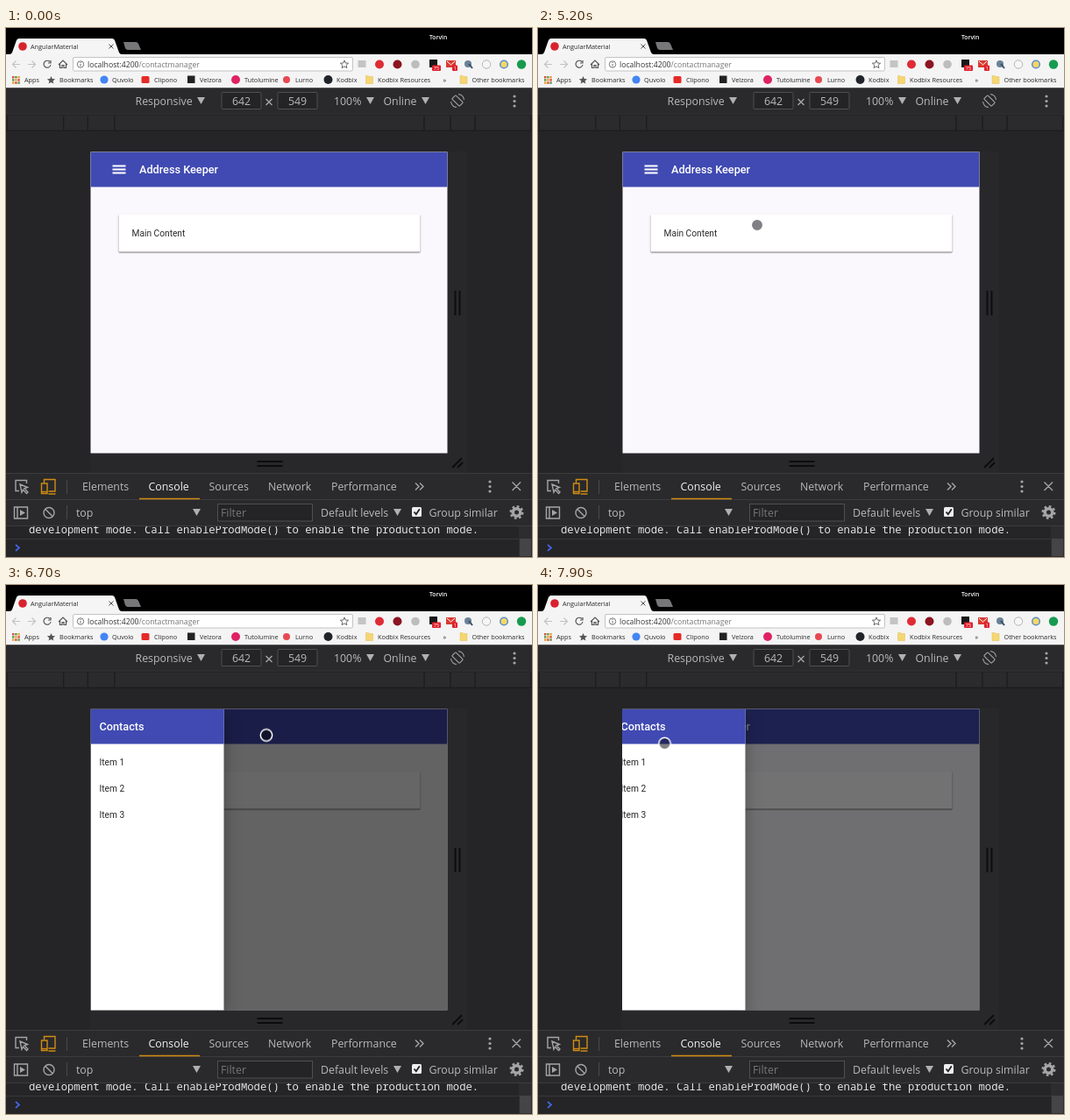
These frames come from a looping animation (600x604 px, 8 s). An HTML page:

```html
<!DOCTYPE html>
<html lang="en">
<head>
<meta charset="utf-8">
<title>Side navigation demo</title>
<style>
html, body { margin: 0; width: 100%; height: 100%; overflow: hidden; background: #252426; }
svg { position: absolute; left: 0; top: 0; }
text { white-space: pre; }
.ui { font-family: "Open Sans", "Noto Sans", sans-serif; }
.small { font-size: 7.3px; fill: #2a2a2a; }
.tools { font-size: 12.35px; fill: #bababa; }
.line { fill: none; stroke: #a5a5a5; stroke-width: 1.4; }
.thin { stroke-width: 1.1; }
.box { fill: #242325; stroke: #4f4e51; }

#page { position: absolute; left: 96px; top: 141px; width: 407px; height: 344px; overflow: hidden;
  transform: translate(.5px, .5px);
  background: #faf8fc; color: #2a2a2a; font: 10.2px/14px Roboto, sans-serif; }
#page div { position: absolute; }
#page .bar { left: 0; top: 0; width: 100%; height: 40px; background: #404ab2; color: #fff;
  font-weight: 500; font-size: 12.7px; line-height: 40px; white-space: nowrap; }
.menu { left: 25px; top: 15px; width: 15px; height: 2px; background: #fff;
  box-shadow: 0 4px #fff, 0 8px #fff; }
.card { left: 31.5px; top: 71px; width: 344px; height: 43px; background: #fff; border-radius: 1px;
  box-shadow: 0 1px 1px rgba(0,0,0,.4), 0 1px 2px rgba(0,0,0,.2); }
.scrim { inset: 0; background: rgba(0,0,0,.6); }
.drawer { left: 0; top: 0; width: 152px; height: 100%; background: #fff;
  box-shadow: 0 5px 6px -3px rgba(0,0,0,.2), 0 10px 15px 1px rgba(0,0,0,.14), 0 4px 19px 3px rgba(0,0,0,.12); }

/* The clock below plays the first 8 s of a 10 s timeline: 1% = 100 ms. */
.drawer, .scrim, .pointer, .arrow, .touch { animation: 10s linear infinite paused; }
.drawer, .scrim { animation-timing-function: cubic-bezier(.25,.8,.25,1); }
.drawer { animation-name: slide; }
.scrim { animation-name: dim; }
.pointer { animation-name: travel; }
.arrow { animation-name: arrow; animation-timing-function: step-end; }
.touch { animation-name: touch; animation-timing-function: step-end; }
@keyframes slide {
  0%, 57.67%, 72.34%, 77.13% { transform: translateX(-152px); visibility: hidden; }
  61.67%, 68.34%, 81.13%, 100% { transform: none; visibility: visible; }
}
@keyframes dim {
  0%, 57.67%, 72.34%, 77.13% { opacity: 0; }
  61.67%, 68.34%, 81.13%, 100% { opacity: 1; }
}
@keyframes travel {
  0%, 40% { transform: translate(54px, 511px); }
  41% { transform: translate(112px, 470px); }
  42% { transform: translate(172px, 433px); }
  43%, 45.5% { transform: translate(54px, 512px); }
  48% { transform: translate(215px, 415px); }
  50% { transform: translate(328px, 320px); }
  52% { transform: translate(250px, 225px); }
  54%, 63% { transform: translate(139px, 169.5px); }
  67%, 69% { transform: translate(297px, 171.5px); }
  70% { transform: translate(293px, 170.5px); }
  72% { transform: translate(275px, 170px); }
  76%, 100% { transform: translate(144.5px, 181px); }
}
@keyframes arrow { 0%, 41%, 46% { opacity: 0; } 40%, 43% { opacity: 1; } 100% { opacity: 0; } }
@keyframes touch { 0%, 43% { opacity: 0; } 41%, 46%, 100% { opacity: 1; } }
</style>
</head>
<body>
<svg class="ui" width="600" height="604" viewBox="0 0 600 604">
  <defs>
    <path id="down" d="M0 0h9l-4.5 8z" fill="#b0b0b0"/>
    <path id="star" d="M0-4.6 1.3-1.5 4.6-1.3 2.1.9 2.9 4.1 0 2.4-2.9 4.1-2.1.9-4.6-1.3-1.3-1.5z"/>
    <path id="folder" d="M0 1h3l1 1h4v8H0z" fill="#f6d673" stroke="#e2bd55" stroke-width=".5"/>
    <g id="dots" fill="#a5a5a5"><circle cy="-5.5" r="1.6"/><circle r="1.6"/><circle cy="5.5" r="1.6"/></g>
    <g id="device" fill="none" stroke-width="1.4">
      <path d="M43.500 519v-3.500h12.500v13.500h-7.500M48.500 532h8M40.500 520h6.500v11.500h-6.500z"/><path d="M41 529.500h6"/>
    </g>
  </defs>

  <!-- browser window -->
  <rect width="600" height="30"/>
  <text x="483" y="12.500" font-size="6.800" font-weight="600" fill="#fff">Torvin</text>
  <path d="M4 30q2 0 3-2l5-14q1-2 3-2h106q2 0 3 2l5 14q1 2 3 2z" fill="#f5f5f5"/>
  <path d="M134 16h14q2 0 3 2l3 7h-15q-2 0-3-2z" fill="#77777a"/>
  <circle cx="19" cy="21" r="4.800" fill="#d8232f"/>
  <text class="small" x="28" y="24">AngularMaterial</text>
  <path d="m117.500 18.500 5 5m0-5-5 5" stroke="#555" fill="none"/>
  <rect y="30" width="600" height="38.500" fill="#f4f4f4"/>
  <g fill="none" stroke="#c3c3c3" stroke-width="1.200">
    <path d="M16 41.500H7.500m4-4-4 4 4 4M25 41.500h8.500m-4-4 4 4-4 4"/>
    <path d="M50 38.500a4 4 0 1 0 1 3.500M51 37v3h-3" stroke="#555"/>
    <path d="m60 42 5-5 5 5m-8.500-1v4.500h2.500v-3h2v3h2.500V41" stroke="#555"/>
  </g>
  <rect x="76.500" y="33.500" width="319" height="15.500" rx="1.500" fill="#fff" stroke="#c4c4c4"/>
  <circle cx="85" cy="41.500" r="3.700" fill="none" stroke="#666" stroke-width=".9"/>
  <path d="M85 41v2.500m0-4.500v1" stroke="#666"/>
  <text x="93" y="44.500" font-size="8.700" fill="#333">localhost:4200<tspan fill="#777">/contactmanager</tspan></text>
  <use href="#star" x="386" y="41.500" fill="none" stroke="#555" stroke-width=".9"/>

  <!-- extensions -->
  <rect x="401.500" y="37" width="9" height="8" fill="#c4c4c4"/>
  <circle cx="426" cy="41.500" r="5" fill="#e02b36"/>
  <circle cx="446.500" cy="41.500" r="5" fill="#8b1420"/>
  <circle cx="467" cy="41.500" r="4.800" fill="#bdbdbd"/>
  <rect x="483" y="36" width="9" height="9" fill="#181818"/>
  <path d="M502 37h11v8h-11z" fill="#d93a31"/><path d="m503 38 4.500 4 4.500-4" stroke="#fff" fill="none"/>
  <g fill="#e0202c"><rect x="486" y="42.500" width="10" height="6.500" rx="1"/><rect x="509" y="42.500" width="6" height="6.500" rx="1"/></g>
  <g font-size="5.500" fill="#fff"><text x="487.800" y="47.900">75</text><text x="510.500" y="47.900">1</text></g>
  <circle cx="527" cy="41" r="4" fill="#6b8197"/><path d="m528 41 4 5" stroke="#34506b" stroke-width="2"/>
  <circle cx="548" cy="41.500" r="4.700" fill="#f6f6f6" stroke="#b5b5b5"/>
  <circle cx="568" cy="41.500" r="4.300" fill="#f4d765" stroke="#5b8ec9" stroke-width="1.500"/>
  <circle cx="588" cy="41.500" r="5.200" fill="#179a50"/>

  <!-- bookmarks -->
  <g id="apps"></g>
  <use href="#star" x="51.500" y="59.500" fill="#555"/>
  <circle cx="112" cy="59" r="4.600" fill="#4285f4"/>
  <rect x="154.500" y="55" width="9" height="8" rx="1.500" fill="#e52a27"/>
  <rect x="207" y="54.500" width="8.500" height="8.500" fill="#222"/>
  <circle cx="262" cy="59" r="5" fill="#df2265"/>
  <circle cx="320" cy="59" r="4" fill="#e74852"/>
  <circle cx="367.500" cy="59" r="5" fill="#202428"/>
  <use href="#folder" x="410.500" y="53.500"/><use href="#folder" x="518" y="53.500"/>
  <g class="small">
    <text x="21" y="62">Apps</text><text x="61" y="62">Bookmarks</text>
    <text x="121" y="62">Quvolo</text><text x="169" y="62">Clipono</text>
    <text x="221" y="62">Velzora</text><text x="272" y="62">Tutolumine</text>
    <text x="330" y="62">Lurno</text><text x="377" y="62">Kodbix</text>
    <text x="424" y="62">Kodbix Resources</text><text x="498.500" y="62">»</text>
    <text x="531.500" y="62">Other bookmarks</text>
  </g>

  <!-- device toolbar -->
  <rect y="68.500" width="600" height="29.500" fill="#2a292b"/>
  <path d="M0 98h600" stroke="#323133"/>
  <path d="M2 100h63v16H2zM67 100h25v16H67zM94 100h29v16H94zM125 100h351v16H125zM478 100h28v16h-28zM508 100h26v16h-26zM536 100h62v16h-62z" fill="#2b2a2c"/>
  <path d="M1.500 100v17M65.500 100v17M93.500 100v17M123.500 100v17M477 100v17M507 100v17M535 100v17M598.500 100v17M0 117.500h600" stroke="#1d1c1e"/>
  <g class="tools">
    <text x="147.500" y="88">Responsive</text><text x="374" y="88">100%</text><text x="430.500" y="88">Online</text>
    <rect class="box" x="246" y="73.500" width="45" height="19" rx="1"/>
    <rect class="box" x="310" y="73.500" width="45" height="19" rx="1"/>
    <text x="268.500" y="88" text-anchor="middle">642</text>
    <text x="332.500" y="88" text-anchor="middle">549</text>
    <path d="m296.500 81 7 7m0-7-7 7" class="line"/>
  </g>
  <use href="#down" x="218" y="79"/><use href="#down" x="411" y="79"/><use href="#down" x="474" y="79"/>
  <g transform="translate(515 83)">
    <rect class="line thin" x="-3" y="-6" width="6" height="12" rx="1" transform="rotate(-45)"/>
    <path class="line thin" d="M-7.500 1a7.500 7.500 0 0 0 6.500 6.500M7.500-1A7.500 7.500 0 0 0 1-7.500"/>
  </g>
  <use href="#dots" x="580" y="83.500"/>

  <!-- viewport handles -->
  <path d="M504 141h22v368H96v-23h408z" fill="#282729"/>
  <path d="M512.500 300v28M517.500 300v28M286.500 495h29M286.500 500h29" stroke="#0c0c0d" stroke-width="1.800"/>
  <path d="m509 502 11-11m-5 11 6-6" stroke="#0c0c0d" stroke-width="1.800"/>

  <!-- developer panel -->
  <text x="26" y="577.300" font-size="12.220" fill="#e4e4e4" style="font-family:'Noto Sans Mono','DejaVu Sans Mono',monospace">development mode. Call enableProdMode() to enable the production mode.</text>
  <rect y="509" width="600" height="59.500" fill="#2a292b"/>
  <path d="M0 508.500h600M0 538.500h600M0 568.500h600" stroke="#3c3b3d"/>
  <path d="M69.500 516v16M69.500 545v16" stroke="#4a494b"/>
  <path class="line" d="M23.500 520v-3.500H11v12h4M16 521l8.500 3.500-3.500 1.300 4 4.200-1.500 1.500-4-4.300-1.500 3z"/>
  <use href="#device" stroke="#d08d14"/>
  <use class="arrow" href="#device" stroke="#f0a01e"/>
  <g class="tools">
    <text x="87" y="528">Elements</text><text x="162.500" y="528" fill="#f2f2f2">Console</text>
    <text x="231.500" y="528">Sources</text><text x="299" y="528">Network</text>
    <text x="371" y="528">Performance</text>
    <text x="80" y="558">top</text><text x="359" y="558">Default levels</text>
    <text x="482.500" y="558">Group similar</text>
    <rect class="box" x="241.500" y="543.500" width="108" height="19.500"/>
    <text x="245" y="558" fill="#777">Filter</text>
  </g>
  <path d="M152 537.500h69" stroke="#d08d14" stroke-width="1.500"/>
  <path class="line" d="m467 519.500 4 4-4 4m5-8 4 4-4 4M577.500 518.500l9.500 9.500m0-9.500-9.500 9.500"/>
  <use href="#dots" x="552" y="523.500"/>
  <path class="line" d="M9.500 547h15v13h-15zM13 547v13"/><path d="m16 550 6 3.500-6 3.500z" fill="#a5a5a5"/>
  <g class="line"><circle cx="49" cy="553.500" r="6"/><path d="m45 549.500 8 8"/></g>
  <use href="#down" x="213" y="549"/><use href="#down" x="442" y="549"/>
  <rect x="463" y="547" width="11" height="11" rx="1.500" fill="#eee"/>
  <path d="m465.500 552.500 2.300 2.700 4-6" fill="none" stroke="#222" stroke-width="1.800"/>
  <g fill="none" stroke="#a5a5a5"><circle cx="582.500" cy="553" r="4.300" stroke-width="3.600"/>
    <circle cx="582.500" cy="553" r="6.800" stroke-width="2.400" stroke-dasharray="2.670"/></g>
  <path d="M0 583.500h585" stroke="#38373a"/>
  <path d="m11 590 4 3.500-4 3.500" fill="none" stroke="#4263e0" stroke-width="1.800"/>
  <rect x="585" y="569" width="15" height="35" fill="#2d2c2e"/><rect x="586" y="583" width="13" height="20" fill="#454446"/>
</svg>

<div id="page">
  <div class="bar"><div class="menu"></div><div style="left:55.500px">Address Keeper</div></div>
  <div class="card"><div style="left:15.500px;top:15px">Main Content</div></div>
  <div class="scrim"></div>
  <div class="drawer">
    <div class="bar"><div style="left:10px">Contacts</div></div>
    <div style="left:10px;top:53.500px">Item 1</div>
    <div style="left:10px;top:83.500px">Item 2</div>
    <div style="left:10px;top:113.500px">Item 3</div>
  </div>
</div>

<svg width="600" height="604" viewBox="0 0 600 604">
  <g class="pointer">
    <path class="arrow" d="M0 0v10l2.300-2 1.700 3.700 1.600-.7L4 7.400h3z" fill="#fff" stroke="#222" stroke-width=".5"/>
    <circle class="touch" r="6.700" fill="rgba(10,10,20,.52)" stroke="#fff" stroke-width="1.500"/>
  </g>
</svg>

<script>
const colours = ['#e04a3f', '#5a9a4a', '#e8a42c'];
let squares = '';
for (let i = 0; i < 9; i++) {
  const col = i % 3, row = (i - col) / 3;
  squares += `<rect x="${7 + col * 3.2}" y="${55 + row * 3.2}" width="2.400" height="2.400" fill="${colours[(col + row) % 3]}"/>`;
}
document.getElementById('apps').innerHTML = squares;

// Step every animation at ten pictures a second.
const LOOP = 8000, STEP = 100;
const animations = document.getAnimations();
const start = performance.now();
function tick() {
  const elapsed = Math.max(0, performance.now() - start) % LOOP;
  const time = Math.floor(elapsed / STEP) * STEP;
  for (const a of animations) a.currentTime = time;
  requestAnimationFrame(tick);
}
tick();
</script>
</body>
</html>
```
